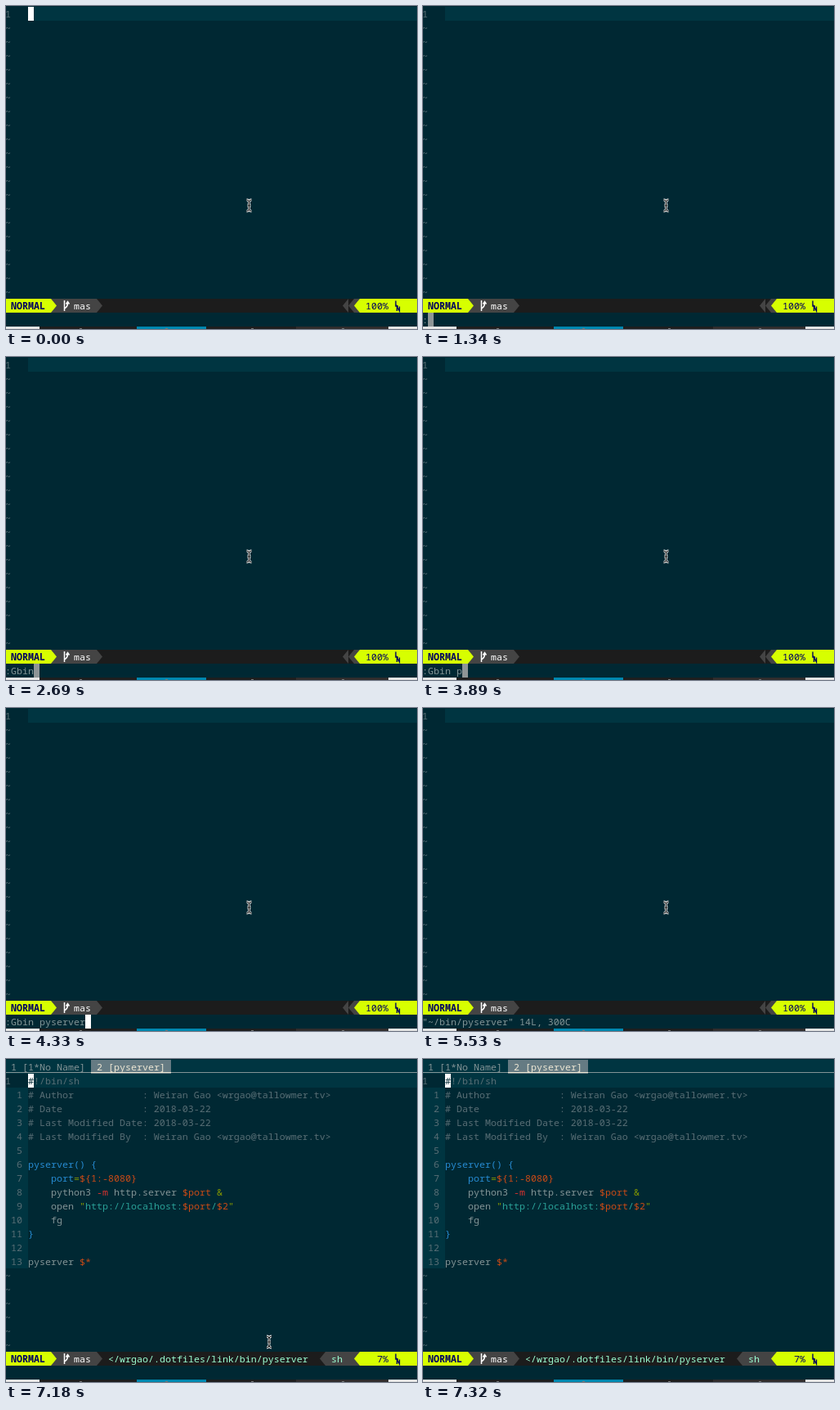
An HTML page with a canvas that plays this animation: 503 px wide and 395 px high, repeating every 7.77 s.

```html
<!DOCTYPE html>
<html lang="en">
<head>
<meta charset="utf-8">
<title>Opening a script in Vim</title>
<style>
html, body { margin: 0; width: 100%; height: 100%; overflow: hidden; background: #002833; }
canvas { display: block; }
</style>
</head>
<body>
<canvas id="stage" width="503" height="395"></canvas>
<script>
const ctx = document.getElementById('stage').getContext('2d');
const W = 503, H = 395, CW = 7, RH = 17, LOOP = 7770;
const FONT = '11.667px "Noto Sans Mono", "DejaVu Sans Mono", monospace';

const C = {
  bg: '#002833', line: '#003541', text: '#839496', dim: '#586e75',
  blue: '#268bd2', orange: '#cb4b16', red: '#dc322f', green: '#859900', cyan: '#2aa198',
  lime: '#d7ff00', navy: '#00005f', grey: '#444444', bar: '#1c1c1c', mint: '#9cffd3',
  sel: '#657b83', white: '#ffffff'
};

// Command line: [start time, typed text]
const TYPED = [
  [1340, ':'], [1790, ':G'], [2390, ':Gb'], [2540, ':Gbi'], [2690, ':Gbin'],
  [3440, ':Gbin '], [3890, ':Gbin p'], [4040, ':Gbin py'], [4330, ':Gbin pyserver']
];
const DONE = 5530, OPEN = 5680, MOVE = 7180, HIDE = 7320;

// Each line is a list of alternating colour and text
const FILE = [
  ['dim', '#!/bin/sh'],
  ['dim', '# Author            : Weiran Gao <wrgao@tallowmer.tv>'],
  ['dim', '# Date              : 2018-03-22'],
  ['dim', '# Last Modified Date: 2018-03-22'],
  ['dim', '# Last Modified By  : Weiran Gao <wrgao@tallowmer.tv>'],
  [],
  ['blue', 'pyserver() {'],
  ['blue', '    port', 'green', '=', 'orange', '${1:-8080}'],
  ['text', '    python3 ', 'red', '-m', 'text', ' http.server ', 'orange', '$port', 'green', ' &'],
  ['text', '    open ', 'green', '"', 'cyan', 'http://localhost:', 'orange', '$port',
   'cyan', '/', 'orange', '$2', 'green', '"'],
  ['text', '    fg'],
  ['blue', '}'],
  [],
  ['text', 'pyserver ', 'orange', '$*']
];

const colX = c => c * CW - 1;
const rowY = r => r * RH + 1;

function rect(x, y, w, h, color) {
  ctx.fillStyle = color;
  ctx.fillRect(x, y, w, h);
}

function cells(col, row, count, color) {
  rect(colX(col), rowY(row), count * CW, RH, color);
}

function put(str, col, row, color, bold) {
  ctx.font = (bold ? 'bold ' : '') + FONT;
  ctx.fillStyle = color;
  ctx.fillText(str, colX(col), rowY(row) + 13);
}

function putRuns(runs, col, row) {
  for (let i = 0; i < runs.length; i += 2) {
    put(runs[i + 1], col, row, C[runs[i]]);
    col += runs[i + 1].length;
  }
}

// Powerline separator in one cell; dir 1 points right, -1 left
function arrow(col, dir, color, back) {
  cells(col, 21, 1, back);
  const y = rowY(21), x = colX(col) + (dir > 0 ? 0 : CW);
  ctx.fillStyle = color;
  ctx.beginPath();
  ctx.moveTo(x, y);
  ctx.lineTo(x + dir * CW, y + RH / 2);
  ctx.lineTo(x, y + RH);
  ctx.fill();
}

function stroke(d, color, width) {
  ctx.strokeStyle = color;
  ctx.lineWidth = width;
  ctx.stroke(new Path2D(d));
}

function status(open) {
  rect(0, rowY(21), W, RH, C.bar);
  cells(0, 21, 8, C.lime);
  put('NORMAL', 1, 21, C.navy, true);
  cells(9, 21, 7, C.grey);
  arrow(8, 1, C.lime, C.grey);
  arrow(16, 1, C.grey, C.bar);
  stroke('M71.5 360V373M71.5 370Q75.5 368 75.5 363M73.5 364.5L75.5 361.5L77.5 364.5', C.white, 1.5);
  put('mas', 12, 21, C.white);
  if (open) {
    put('</wrgao/.dotfiles/link/bin/pyserver', 18, 21, C.mint);
    cells(56, 21, 5, C.grey);
    arrow(55, -1, C.grey, C.bar);
    put('sh', 57, 21, C.mint);
  } else {
    arrow(59, -1, C.grey, C.bar);
    arrow(60, -1, C.grey, C.bar);
  }
  rect(colX(62), rowY(21), W, RH, C.lime);
  arrow(61, -1, C.lime, C.grey);
  put(open ? '  7%' : '100%', 63, 21, C.navy);
  stroke('M477 360.5V367H480M478.5 373V367.5L481.5 373V367.5', C.navy, 1.4);
}

function dock() {
  rect(0, 392, W, 3, '#e4e4e4');
  rect(41, 392, 119, 3, '#1e1e1e');
  rect(160, 392, 85, 3, '#0087af');
  rect(245, 392, 110, 3, '#1e1e1e');
  rect(355, 392, 113, 3, '#302d2d');
  for (const x of [90, 195, 300, 411]) rect(x, 394, 3, 1, '#777777');
}

function pointer(x, y) {
  const d = 'M-3 -7Q0 -7 0 -4V4Q0 7 -3 7M3 -7Q0 -7 0 -4M0 4Q0 7 3 7M-2 0H2';
  ctx.save();
  ctx.translate(x, y);
  stroke(d, '#e8e8e8', 2.8);
  stroke(d, '#101010', 1);
  ctx.restore();
}

function tildes(from) {
  for (let r = from; r < 21; r++) put('~', 0, r, C.dim);
}

function emptyBuffer(t) {
  rect(colX(4), rowY(0), W, RH, C.line);
  put('1', 0, 0, C.dim);
  tildes(1);
  if (t < TYPED[0][0]) cells(4, 0, 1, C.white);
}

function fileBuffer() {
  rect(0, rowY(0), W, RH, C.line);
  cells(15, 0, 14, C.sel);
  put('1 [1*No Name]', 1, 0, C.text);
  put('2 [pyserver]', 16, 0, '#eee8d5');
  rect(0, 16, W, 1, C.text);
  rect(colX(15), 16, 14 * CW, 1, '#eee8d5');

  rect(colX(4), rowY(1), W, RH, C.line);
  rect(0, rowY(2), colX(4), 13 * RH, C.line);
  FILE.forEach((runs, i) => {
    put(i ? String(i).padStart(3) : '1', 0, i + 1, C.dim);
    putRuns(runs, 4, i + 1);
  });
  cells(4, 1, 1, C.white);
  put('#', 4, 1, C.bg);
  tildes(FILE.length + 1);
}

function commandLine(t) {
  if (t < TYPED[0][0] || t >= OPEN) return;
  if (t >= DONE) {
    put('"~/bin/pyserver" 14L, 300C', 0, 22, C.text);
    return;
  }
  const [start, str] = TYPED.filter(step => step[0] <= t).pop();
  put(str, 0, 22, C.text);
  cells(str.length, 22, 1, start < 4330 ? '#8e9596' : C.white);
}

function draw(t) {
  const open = t >= OPEN;
  rect(0, 0, W, H, C.bg);
  if (open) fileBuffer();
  else emptyBuffer(t);
  status(open);
  commandLine(t);
  dock();
  if (t < MOVE) pointer(297.5, 244);
  else if (t < HIDE) pointer(322, 346);
}

function tick() {
  draw(performance.now() % LOOP);
  requestAnimationFrame(tick);
}
tick();
</script>
</body>
</html>
```
